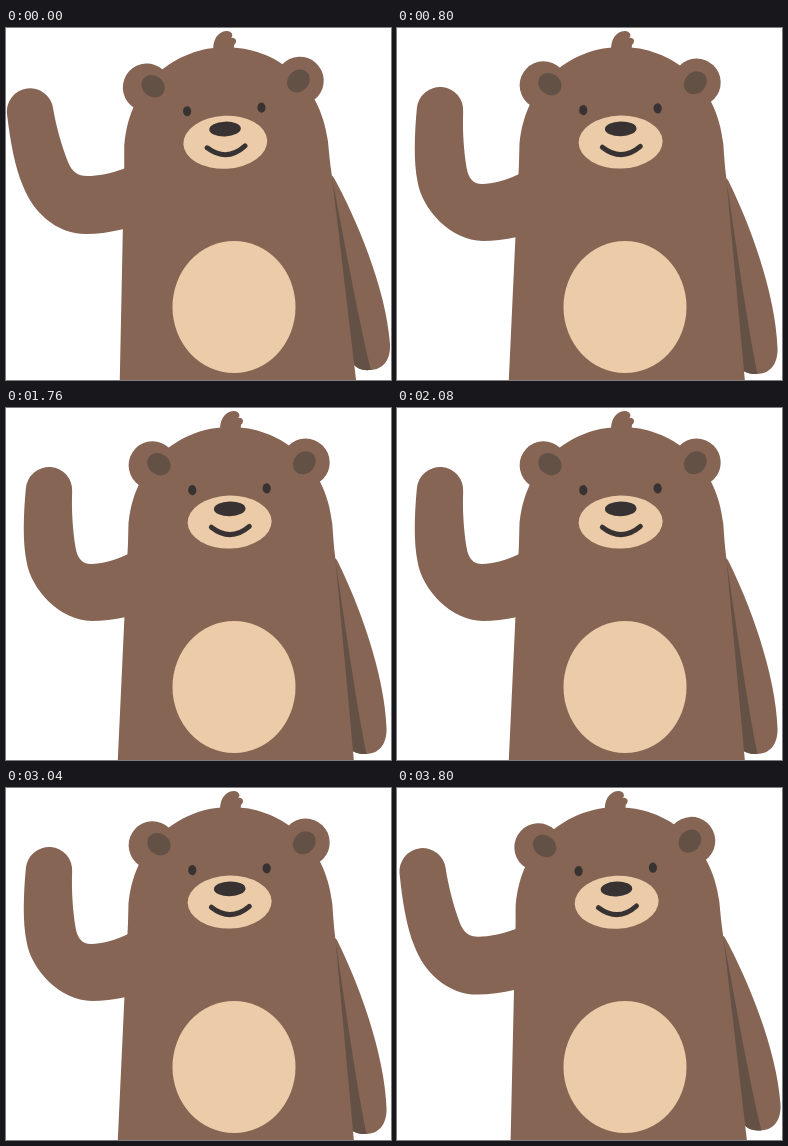
These frames come from a looping animation (385x352 px, 3840 ms). An HTML page:

```html
<!DOCTYPE html>
<html lang="en">
<head>
<meta charset="utf-8">
<title>Waving bear</title>
<style>
html, body { margin: 0; width: 385px; height: 352px; overflow: hidden; background: #fff; }
svg { display: block; }
.fur { fill: #876554; }
.shade { fill: #645145; }
.tan { fill: #eccba9; }
.ink { fill: #383332; }
</style>
</head>
<body>
<svg width="385" height="352" viewBox="0 0 385 352">
  <g id="rest">
    <path class="fur" d="M320 146Q326 146 328 150C350 190 380 260 384 316C385 334 375 342 364 342C354 343 349 339 346 334L318 170Z"/>
    <path class="shade" d="M320 146L326 150C336 200 352 290 365 342C354 343 349 339 346 334L318 170Z"/>
  </g>
  <path id="wave" class="fur"/>
  <!-- body is drawn upright around its pivot -->
  <g id="body">
    <path class="fur" d="M-8 -256C-9 -268 -3 -277 6 -277C12 -277 13 -271 10 -270C15 -271 17 -266 13 -263L12 -256Z"/>
    <circle class="fur" cx="-76.3" cy="-224.5" r="24"/>
    <circle class="fur" cx="76.8" cy="-223.8" r="24"/>
    <path class="fur" d="M-122 130L-104 -130C-103 -140 -102.5 -150 -102 -162C-97 -225 -50 -261 0 -261C50 -261 97 -225 102 -162C102.5 -150 103 -140 104 -130L122 130Z"/>
    <ellipse class="shade" rx="12.3" ry="10.5" transform="translate(-70 -225.5) rotate(40)"/>
    <ellipse class="shade" rx="12.3" ry="10.5" transform="translate(75.4 -223.6) rotate(-45)"/>
    <ellipse class="ink" cx="-37.2" cy="-198.8" rx="4.1" ry="5.1"/>
    <ellipse class="ink" cx="37.2" cy="-198.8" rx="4.1" ry="5.1"/>
    <ellipse class="tan" cx="-.6" cy="-166" rx="42" ry="26.5"/>
    <ellipse class="ink" cx="-.2" cy="-179.2" rx="15.8" ry="7.4"/>
    <path d="M-19 -161.3Q0 -145.7 19 -161.3" fill="none" stroke="#383332" stroke-width="5" stroke-linecap="round"/>
  </g>
  <ellipse class="tan" cx="228" cy="279" rx="61.5" ry="66"/>
</svg>
<script>
const LOOP = 3840, SWING = 640, STEP = 40;
const PIVOT = [228, 280], SHOULDER = [325, 148], ELBOW = [38, 150];
const $ = id => document.getElementById(id);

function turn(x, y, deg) {
  const a = deg * Math.PI / 180, c = Math.cos(a), s = Math.sin(a);
  return [x * c - y * s, x * s + y * c];
}

// 0 at the outer end of the wave, 1 at the inner end
function swing(t) {
  const p = (t % SWING) / SWING * 2;
  const s = p < 1 ? p : 2 - p;
  return s * s * (3 - 2 * s);
}

function waveArm(u) {
  const fmt = p => p[0].toFixed(2) + ' ' + p[1].toFixed(2) + ' ';
  // upper-arm point that drifts, and forearm point that turns at the elbow
  const up = (x, y, dx, dy) => fmt([x + dx * u, y + dy * u]);
  const fore = (x, y) => {
    const [a, b] = turn(x - ELBOW[0], y - ELBOW[1], 24 * u);
    return fmt([ELBOW[0] + 9.6 * u + a, ELBOW[1] + 0.8 * u + b]);
  };
  return 'M' + up(140, 132, 4, 10) +
    'L' + up(117, 141, 6, 12) +
    'C' + up(105, 145.5, 6, 14) + up(92, 148, 8, 16) + up(81, 148, 8, 16) +
    'C' + up(72, 148, 8, 16) + fore(66, 144) + fore(62, 134) +
    'C' + fore(56, 119) + fore(50, 98) + fore(47, 80) +
    'A23.2 23.2 0 0 0 ' + fore(1, 86) +
    'C' + fore(4, 112) + fore(9, 140) + fore(17, 158) +
    'C' + fore(27, 184) + up(50, 206, 8, 14) + up(80, 206, 12, 14) +
    'C' + up(92, 206, 8, 14) + up(105, 204, 6, 15) + up(118, 201, 4, 16) +
    'L' + up(140, 196, 4, 16) + 'Z';
}

function draw(t) {
  const u = swing(t), tilt = 3 * u;
  $('body').setAttribute('transform', `translate(${PIVOT}) rotate(${tilt - 2.8})`);
  $('wave').setAttribute('d', waveArm(u));
  const [sx, sy] = turn(SHOULDER[0] - PIVOT[0], SHOULDER[1] - PIVOT[1], tilt);
  const hang = 3.1 * u * (2 - u);
  $('rest').setAttribute('transform',
    `translate(${PIVOT[0] + sx} ${PIVOT[1] + sy}) rotate(${hang}) translate(${-SHOULDER[0]} ${-SHOULDER[1]})`);
}

const start = performance.now();
function tick() {
  const t = (performance.now() - start) % LOOP;
  draw(Math.floor(t / STEP) * STEP);
  requestAnimationFrame(tick);
}
tick();
</script>
</body>
</html>
```
